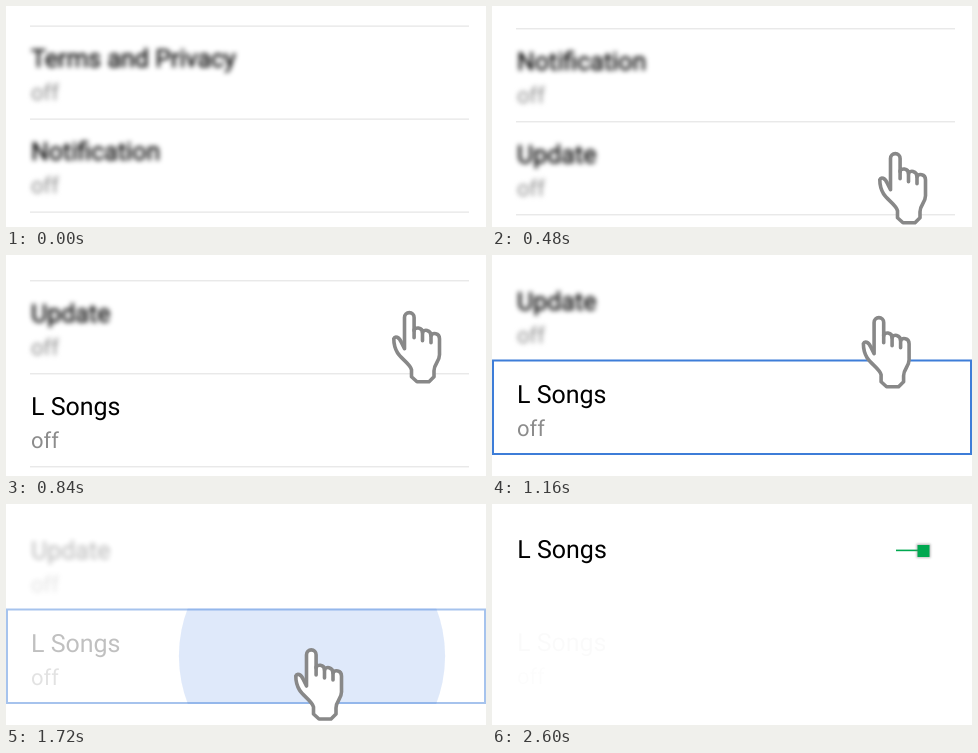
These frames come from a looping animation (480x221 px, 3200 ms). An HTML page:

```html
<!DOCTYPE html>
<html lang="en">
<head>
<meta charset="utf-8">
<title>Settings walkthrough</title>
<style>
  html, body { margin: 0; width: 100%; height: 100%; overflow: hidden; background: #fff; }
  svg { display: block; width: 100%; height: 100%; }
  text { font-family: Roboto, sans-serif; text-rendering: geometricPrecision; }
  .title { font-size: 25px; fill: #000; }
  .state { font-size: 22px; fill: #8c8c8c; }
  .blurred { filter: url(#soft); }
  .blurred .title { stroke: #000; stroke-width: .4px; }
</style>
</head>
<body>
<svg viewBox="0 0 480 221">
  <defs>
    <filter id="soft" filterUnits="userSpaceOnUse" x="0" y="0" width="480" height="500"
      color-interpolation-filters="sRGB">
      <feGaussianBlur stdDeviation="2.9"/>
    </filter>
    <filter id="glow" x="-50%" y="-50%" width="200%" height="200%">
      <feGaussianBlur stdDeviation="1.3"/>
    </filter>
    <clipPath id="view"><rect y="17" width="480" height="204"/></clipPath>
    <clipPath id="cell"><rect y="104.5" width="480" height="95.5"/></clipPath>
  </defs>

  <g id="screen" clip-path="url(#view)">
    <g id="list"><g id="rules" fill="#dfdfdf"></g></g>
  </g>
  <rect id="frame" x="1" y="105.5" width="478" height="93.5" fill="none" stroke="#3d7dd8" stroke-width="2"/>
  <g clip-path="url(#cell)">
    <circle id="ripple" cx="306" cy="152" fill="#3a76dc"/>
  </g>

  <g id="page">
    <text class="title" x="25.3" y="53.8">L Songs</text>
    <g opacity=".016">
      <text class="title" x="25" y="147">L Songs</text>
      <text class="state" x="25" y="180">off</text>
    </g>
    <rect id="track" x="404" y="45.6" width="29" height="1.6"/>
    <g id="knob">
      <rect x="-7" y="39.8" width="14" height="14" fill="#777" opacity=".5" filter="url(#glow)"/>
      <rect id="face" x="-6" y="41" width="12" height="12"/>
    </g>
  </g>

  <g id="hand" fill="#fff" stroke="#888" stroke-width="3.6" stroke-linecap="round" stroke-linejoin="round">
    <path d="M-4.5 36V4.7a4.8 4.8 0 0 1 9.6 0V18C5.500 14 13.500 14 13.500 20C14.500 16 22 17 22 23
      C23.500 19.500 30.500 20 30.500 26V42C30.500 49 25 51 25 58V64L20 69H8L2.500 64V57
      C1 51-8 46-11.500 40C-14.500 35-15.200 30-15.200 26C-14 23-10 24-8 29Z"/>
    <path d="M5.100 17V25M13.500 20V28M22 23V30" fill="none"/>
  </g>
</svg>
<script>
const LOOP = 3200, ROW = 93, SCROLL = 192;
const NS = 'http://www.w3.org/2000/svg';
const $ = id => document.getElementById(id);
const list = $('list'), rules = $('rules'), hand = $('hand');

function add(parent, tag, attrs, text) {
  const el = document.createElementNS(NS, tag);
  set(el, attrs);
  if (text) el.textContent = text;
  return parent.appendChild(el);
}
function set(el, attrs) {
  for (const k in attrs) el.setAttribute(k, attrs[k]);
}

['Terms and Privacy', 'Notification', 'Update', 'L Songs'].forEach((name, i, all) => {
  const y = 20 + i * ROW;
  const row = add(list, 'g', i < all.length - 1 ? { class: 'blurred' } : {});
  add(row, 'text', { class: 'title', x: 25, y: y + 41 }, name);
  add(row, 'text', { class: 'state', x: 25, y: y + 74 }, 'off');
});
for (let i = 0; i < 5; i++) {
  add(rules, 'rect', { x: 24, y: 19.6 + i * ROW, width: 439, height: 1 });
}

const part = (t, from, to) => Math.min(1, Math.max(0, (t - from) / (to - from)));
const ease = u => (1 - Math.cos(Math.PI * u)) / 2;
const mix = (a, b, u) => a + (b - a) * u;
const move = (el, x, y) => set(el, { transform: `translate(${x} ${y})` });

function draw(t) {
  // drag the list
  const scroll = SCROLL * ease(part(t, 0, 1000));
  move(list, 0, -scroll);
  const picked = t >= 1040;
  set(rules, { opacity: picked ? 0 : 1 });

  // tap the row, then change page
  const fade = 1 - part(t, 1600, 1760);
  set($('screen'), { opacity: fade });
  set($('frame'), { opacity: picked ? fade ** .55 : 0 });
  set($('ripple'), {
    r: 1.1 * Math.max(0, Math.min(t, 1840) - 1600),
    opacity: .16 * (1 - part(t, 1740, 1840))
  });
  set($('page'), { opacity: part(t, 1760, 1840) });

  // switch on
  const on = ease(part(t, 2400, 2600));
  const color = `rgb(${mix(112, 0, on)},${mix(112, 168, on)},${mix(112, 80, on)})`;
  set($('track'), { fill: color });
  set($('face'), { fill: color });
  move($('knob'), mix(405, 431.5, on), 0);

  // pointer
  const toRow = ease(part(t, 1000, 1600)), toSwitch = ease(part(t, 2000, 2336));
  move(hand,
    mix(mix(403, 305, toRow), 406, toSwitch),
    mix(mix(238 - scroll, 146, toRow), 50.5, toSwitch));
  set(hand, { opacity: t < 2600 ? 1 : 0 });
}

const start = performance.now();
function tick() {
  draw((performance.now() - start) % LOOP);
  requestAnimationFrame(tick);
}
tick();
</script>
</body>
</html>
```
